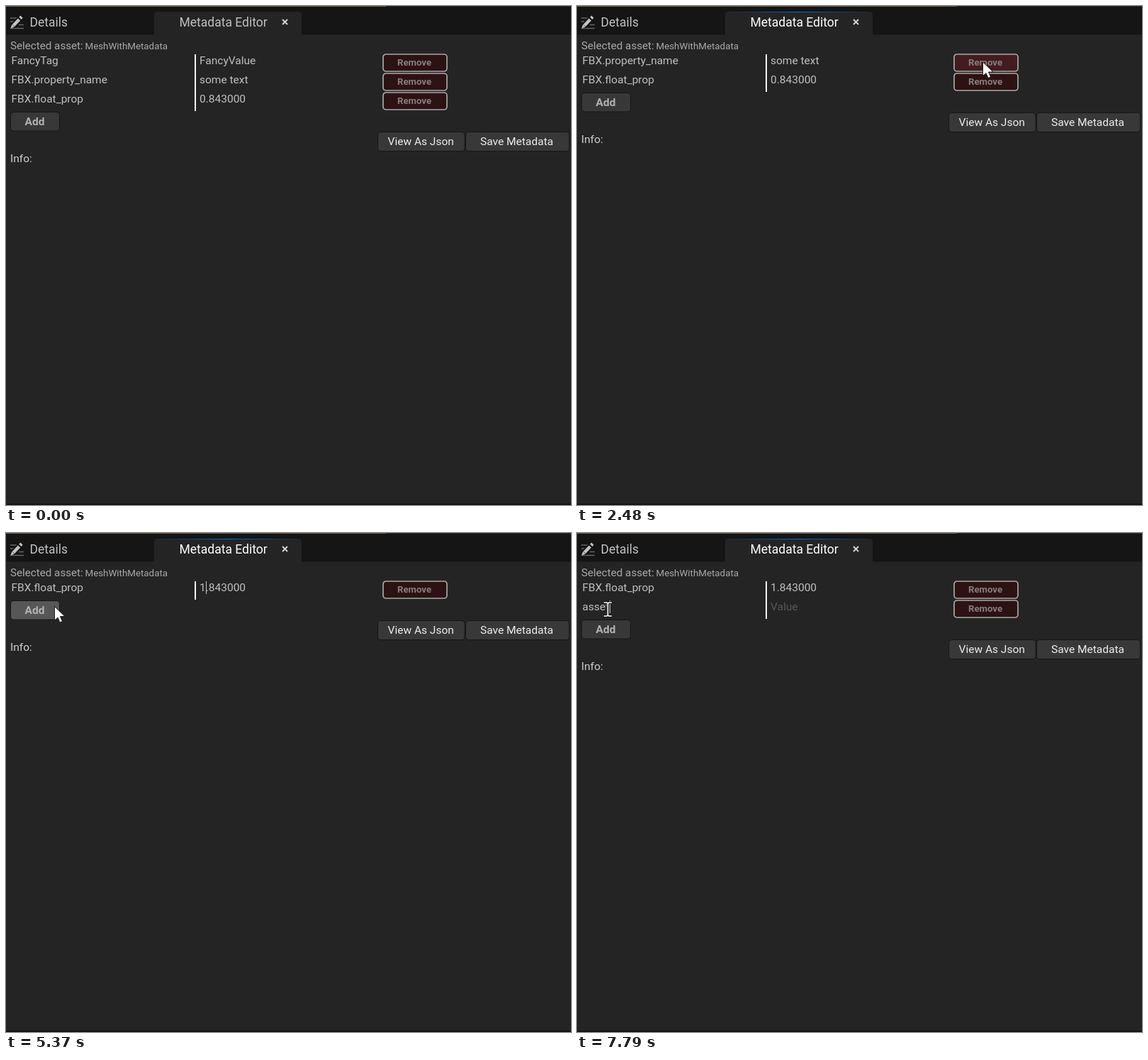
Animation of 797 by 703 pixels, one loop 8000 ms. Source, as an HTML page:

```html
<!DOCTYPE html>
<html lang="en">
<head>
<meta charset="utf-8">
<title>Metadata Editor</title>
<style>
  html, body { margin: 0; width: 100%; height: 100%; overflow: hidden; background: #242424; }
  svg { display: block; width: 797px; height: 703px; }
  text { font: 15.5px Roboto, "Open Sans", sans-serif; fill: #c0c0c0; white-space: pre; }
  .tab { font-size: 17.5px; }
  .label { font-size: 15.2px; fill: #a9a9a9; }
  .small { font-size: 13.35px; fill: #a9a9a9; }
  .bold { font-weight: 700; text-anchor: middle; }
  .mid { text-anchor: middle; fill: #ececec; }
  .btn { fill: #383838; stroke: #161616; }
  .remove { fill: #2d1213; stroke: #aaa6a6; stroke-width: 1.7; }
  .hot.remove { fill: #431c1f; }
  .hot.btn { fill: #575757; }
  .removeText { font-size: 13.2px; fill: #877d7d; }
  text.hint { fill: #575757; }
</style>
</head>
<body>
<svg viewBox="0 0 797 703">
  <defs>
    <linearGradient id="glow">
      <stop offset="0" stop-color="#0070e0" stop-opacity="0"/>
      <stop offset=".5" stop-color="#0070e0"/>
      <stop offset="1" stop-color="#0070e0" stop-opacity="0"/>
    </linearGradient>
  </defs>
  <rect width="797" height="703" fill="#242424"/>
  <rect width="797" height="40.5" fill="#151515"/>
  <rect width="536" height="1" fill="#705d47"/>
  <rect x="536" width="261" height="1" fill="#2a2827"/>
  <rect y="701" width="797" height="2" fill="#171113"/>
  <path d="M209 41V13q0-5 5-5H412q5 0 5 5V41Z" fill="#242424"/>
  <rect id="tabLine" x="209" y="8" width="208" height="1" fill="url(#glow)"/>

  <g fill="none" stroke="#666" stroke-width="1.6">
    <path d="M6 17H15M6 22H11M18 26.5H25M6 31.5H25"/>
    <path d="M9 29L21 16" stroke="#151515" stroke-width="8"/>
    <path d="M10.5 27.5L18.5 19M20 17.3L22 15.2" stroke="#c4c4c4" stroke-width="4.6"/>
    <path d="M6.5 31.5L8.3 26 12 29.5Z" fill="#c4c4c4" stroke="none"/>
  </g>
  <text class="tab" x="33.5" y="28.6">Details</text>
  <text class="tab" id="title" x="244.5" y="28.6">Metadata Editor</text>
  <path d="M390 19L397 26M397 19L390 26" stroke="#d2d2d2" stroke-width="2"/>

  <text class="label" x="6" y="61">Selected asset:</text>
  <text class="small" x="111.5" y="61">MeshWithMetadata</text>

  <g id="rows"></g>
  <rect id="divider" x="266" y="68" width="2" fill="#f2f2f2"/>
  <g id="footer">
    <rect id="add" class="btn" x="6.5" y=".5" width="69" height="26.5" rx="4"/>
    <text class="bold" x="40.5" y="18.5" style="fill:#b2b2b2">Add</text>
    <rect class="btn" x="524.5" y="28.5" width="122.5" height="27" rx="4"/>
    <text class="mid" x="585.2" y="46.5">View As Json</text>
    <rect class="btn" x="648.5" y="28.5" width="146" height="27" rx="4"/>
    <text class="mid" x="720.5" y="46.5">Save Metadata</text>
    <text x="6" y="70.5" style="fill:#d0d0d0">Info:</text>
  </g>
  <rect id="caret" width="1" height="18" fill="#c8c8c8"/>
  <circle id="ring" r="15.7" fill="#ff0" fill-opacity=".42"/>
  <path id="arrow" d="M0 0V19.5L4.5 15.5 7.5 22.5 11 21 8 14H14.5Z" fill="#fff" stroke="#111" stroke-width=".9"/>
  <g id="beam" fill="none">
    <path stroke="#111" stroke-width="3.4"/>
    <path stroke="#fff" stroke-width="1.7"/>
  </g>
</svg>
<script>
const LOOP = 8000, TOP = 68, PITCH = 27;
const $ = id => document.getElementById(id);

// Pointer path: time, x, y
const path = [
  [270, 668, 668], [460, 610, 520], [660, 505, 330], [860, 474, 190],
  [1070, 570, 94], [1130, 574, 84], [1200, 574, 79], [2470, 574, 79], [2480, 572.5, 79],
  [3220, 572.5, 79], [3820, 333, 78], [4090, 289.5, 78], [4360, 282, 77.5],
  [4830, 282, 77.5], [5365, 68.5, 103.5], [5430, 68.5, 103.5], [5500, 66, 106], [5770, 66, 106],
  [6250, 67, 119], [6320, 75, 113], [6570, 75, 113], [6680, 52, 104], [6790, 43.5, 107.5]
];
const clicks = [[1870, 2070], [3080, 3280], [4700, 4830], [5570, 5700], [6380, 6570]];

// Latest value of a [time, value] list
const at = (list, t) => list.reduce((v, [when, next]) => t >= when ? next : v, null);

const tag = [[0, ""], [6990, "a"], [7260, "as"], [7390, "ass"], [7590, "asse"], [7790, "asset"]];
const number = [[0, "0.843000"], [4970, ".843000"], [5100, "1.843000"]];

const fancy = () => ["FancyTag", "FancyValue"];
const prop = () => ["FBX.property_name", "some text"];
const float = t => ["FBX.float_prop", at(number, t)];
const fresh = t => [at(tag, t), ""];
const tables = [
  [0, [fancy, prop, float]], [2140, [prop, float]],
  [3350, [float]], [5770, [float, fresh]]
];

const carets = [
  [0, null], [4830, { row: 0, x: 273.5, text: () => "0" }], [4970, { row: 0, x: 273.5, text: () => "" }],
  [5100, { row: 0, x: 273.5, text: () => "1" }], [5570, null],
  [6440, { row: 1, x: 8, text: t => at(tag, t) }]
];

$("rows").innerHTML = [0, 1, 2].map(i => `<g transform="translate(0 ${TOP + i * PITCH})">
  <text x="7.5" y="14"></text><text x="273" y="14"></text>
  <rect class="remove" x="532" y="0" width="90" height="24" rx="4"/>
  <text class="bold removeText" x="576" y="16">Remove</text></g>`).join("");
const rows = [...$("rows").children];

for (const p of $("beam").children)
  p.setAttribute("d", "M-5.5-9.5H-1.5L0-8.5 1.5-9.5H5.5M0-8.5V8.5M-5.5 9.5H-1.5L0 8.5 1.5 9.5H5.5");

const show = (el, on) => el.setAttribute("visibility", on ? "visible" : "hidden");
const place = (el, x, y) => el.setAttribute("transform", `translate(${x} ${y})`);

const ruler = document.createElement("canvas").getContext("2d");
ruler.font = "15.5px Roboto, 'Open Sans', sans-serif";

function pointer(t) {
  const i = path.findIndex(p => p[0] > t);
  if (i === 0) return null;
  if (i < 0) return path[path.length - 1].slice(1);
  const [a, b] = [path[i - 1], path[i]], k = (t - a[0]) / (b[0] - a[0]);
  return [a[1] + (b[1] - a[1]) * k, a[2] + (b[2] - a[2]) * k];
}

function setField(el, value, hint) {
  el.textContent = value || hint;
  el.classList.toggle("hint", !value);
}

function draw(t) {
  const table = at(tables, t), bottom = TOP + table.length * PITCH;
  const pos = pointer(t), [x, y] = pos || [-99, -99];
  const inside = (l, top, r, b) => x >= l && x <= r && y >= top && y < b;

  rows.forEach((g, i) => {
    show(g, i < table.length);
    if (i >= table.length) return;
    const [name, value] = table[i](t), [nameEl, valueEl, button] = g.children;
    setField(nameEl, name, "Tag Name");
    setField(valueEl, value, "Value");
    const top = TOP + i * PITCH;
    button.classList.toggle("hot", inside(531, top, 623, top + 25));
  });
  $("divider").setAttribute("height", bottom - TOP - 1);
  place($("footer"), 0, bottom);
  $("add").classList.toggle("hot", inside(7, bottom, 76, bottom + PITCH));

  const active = t >= 2070;
  show($("tabLine"), active);
  $("title").style.fill = active ? "#fff" : "#c0c0c0";

  const caret = at(carets, t);
  show($("caret"), caret);
  if (caret) {
    const width = ruler.measureText(caret.text(t)).width;
    place($("caret"), Math.round(caret.x + width), TOP + caret.row * PITCH);
  }

  const overText = inside(0, TOP, 530, bottom);
  show($("arrow"), pos && !overText);
  show($("beam"), pos && overText);
  show($("ring"), clicks.some(([on, off]) => t >= on && t < off));
  for (const id of ["arrow", "beam", "ring"]) place($(id), x, y);
}

const start = performance.now();
function tick() {
  draw((performance.now() - start) % LOOP);
  requestAnimationFrame(tick);
}
tick();
</script>
</body>
</html>
```
